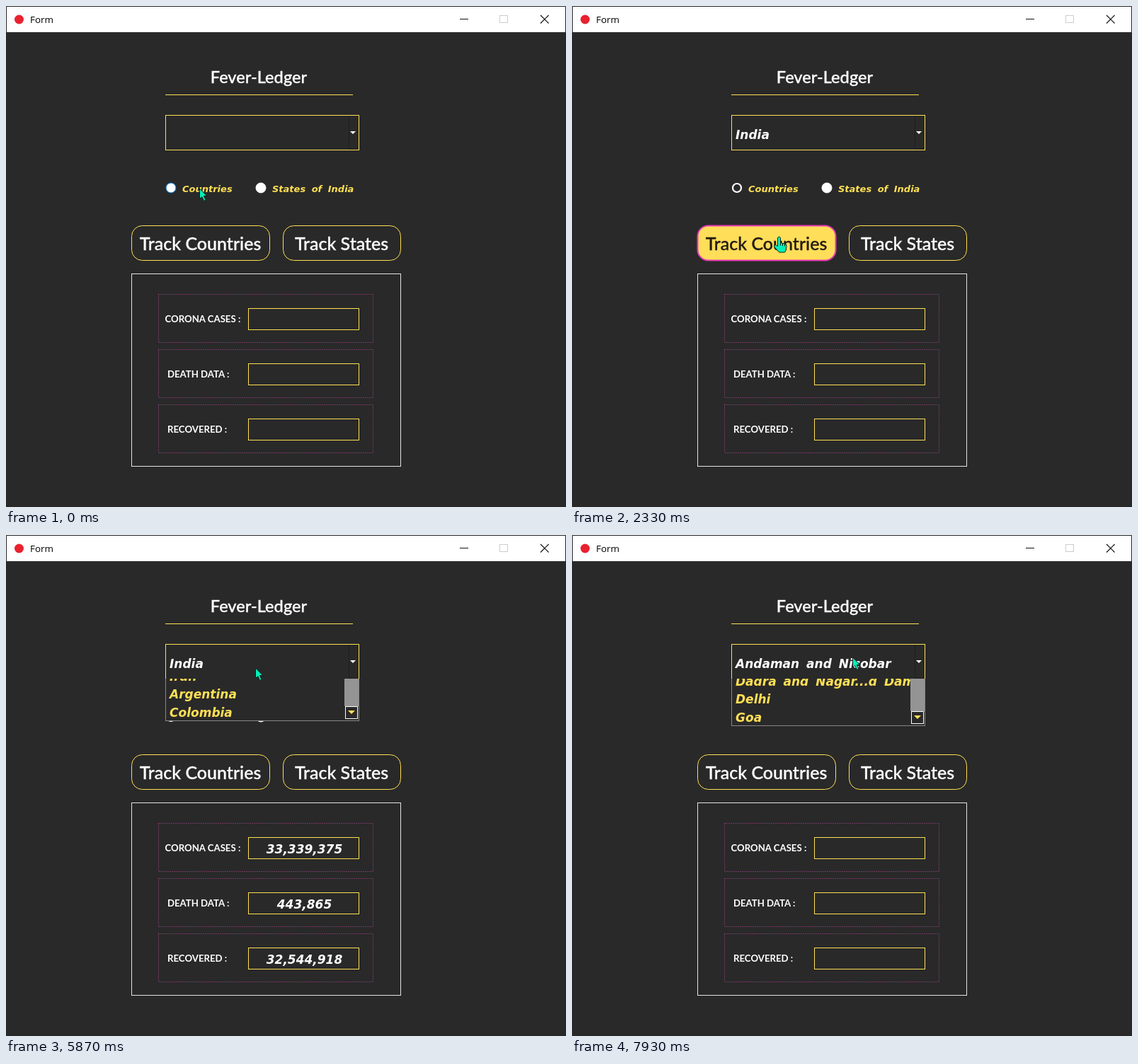
An HTML page for the animation above (8 s loop, 791 by 708 pixels).

```html
<!DOCTYPE html>
<html lang="en">
<head>
<meta charset="utf-8">
<title>Form</title>
<style>
  html, body { margin: 0; width: 791px; height: 708px; overflow: hidden; background: #292929; }
  svg { display: block; }
  text { fill: #fff; white-space: pre; }
  .title { font: 500 25px Lato, sans-serif; stroke: #fff; stroke-width: .35px; }
  .label { font: 700 13.2px Lato, sans-serif; }
  .hand { font: italic 700 17px "DejaVu Sans", sans-serif; word-spacing: 4px; }
  .radio { font-size: 13px; }
  .radio, .row { fill: #ffe054; }
  .num { text-anchor: middle; }
  .mid { text-anchor: middle; }
  .box { fill: none; stroke: #ffe054; }
  .dots { fill: none; stroke: #b8489c; stroke-dasharray: 1 2; }
  .hover rect { fill: #ffde59; stroke: #e63bb4; stroke-width: 2; }
  .hover text { fill: #241c10; stroke: #241c10; }
  .cursor { fill: #00f0b8; stroke: #10201c; }
</style>
</head>
<body>
<svg width="791" height="708">
  <defs>
    <pattern id="check" width="2" height="2" patternUnits="userSpaceOnUse">
      <rect width="2" height="2" fill="#292929"/>
      <path d="M0 0h1v1h-1zM1 1h1v1h-1z" fill="#fff"/>
    </pattern>
  </defs>

  <rect width="791" height="708" fill="#292929"/>
  <rect width="791" height="37" fill="#fff"/>
  <path d="M.5 708V.5H790.5V708M0 707.5H791" fill="none" stroke="#262626"/>
  <circle cx="18.5" cy="19" r="6.5" fill="#e8222e"/>
  <text x="34" y="24" style="font:13.4px 'Open Sans',sans-serif;fill:#000">Form</text>
  <path d="M641 18.5h12M755 13l11.5 11.5M766.5 13L755 24.5" stroke="#111" stroke-width="1.2"/>
  <rect x="697.5" y="13.5" width="11" height="10" fill="none" stroke="#ccc"/>

  <text class="title mid" x="357" y="109" style="font-size:23.6px">Fever-Ledger</text>
  <path class="box" d="M225 125.5H490"/>

  <rect class="box" x="225.5" y="154.5" width="273" height="49"/>
  <path d="M484.5 156V202.5H497" fill="none" stroke="#1f1f1f"/>
  <path d="M486 177h8l-4 4z" fill="#fff"/>
  <text id="choice" class="hand" x="231" y="187.5"></text>

  <g id="radios"></g>
  <g id="buttons"></g>

  <rect x="177.5" y="378.5" width="380" height="272" fill="none" stroke="#e4e4e4"/>
  <g id="fields"></g>

  <svg x="225" y="203" width="278" height="256">
    <g id="popup">
      <rect id="shade" x="274" y="4" width="4" height="252" fill="#000" opacity=".3"/>
      <rect x=".5" y=".5" width="273" height="255" fill="#292929" stroke="#888"/>
      <g id="rows"></g>
      <rect x="253" y="1" width="20" height="254" fill="#292929"/>
      <rect x="253" y="42" width="21" height="193" fill="url(#check)"/>
      <g fill="#292929" stroke="#fff">
        <rect x="254.5" y="2.5" width="17" height="17"/>
        <rect x="254.5" y="22.5" width="17" height="19"/>
        <rect x="254.5" y="235.5" width="17" height="17"/>
      </g>
      <path d="M258 13h10l-5-5zM258 241h10l-5 5z" fill="#ffe054"/>
      <path d="M273.5 1V255" stroke="#888"/>
    </g>
  </svg>

  <path id="arrow" class="cursor" d="M0 -.5V14L3.3 11L6 17L8.5 15.8L6 10H10.3Z"/>
  <path id="finger" class="cursor" d="M-1 1Q1 -2 3 1V8L9 9.5Q12 10 11.5 13L10.5 19L9 21.5H1L-6 13.5Q-6 11 -4 11L-1 13ZM3 8V12M6 9V12.5M9 9.5V13"/>
</svg>

<script>
const $ = id => document.getElementById(id);
const STEP = 8000 / 120, ROW = 25.44;
const countries = ["USA", "India", "Brazil", "UK", "Russia", "France", "Turkey", "Iran", "Argentina", "Colombia"];
const states = ["Andaman and Nicobar", "Andhra Pradesh", "Arunachal Pradesh", "Assam", "Bihar", "Chandigarh",
  "Chhattisgarh", "Dadra and Nagar...d Dam", "Delhi", "Goa"];

$("radios").innerHTML = [[233, "Countries"], [360, "States of India"]].map(([x, name]) =>
  `<circle cx="${x}" cy="257"/><text class="hand radio" x="${x + 16}" y="263">${name}</text>`).join("");

$("buttons").innerHTML = [[177.5, 195, "Countries"], [391.5, 166, "States"]].map(([x, w, name]) =>
  `<g><rect class="box" x="${x}" y="310.5" width="${w}" height="49" rx="15"/>
   <text class="title mid" x="${x + w / 2 - .5}" y="345">Track ${name}</text></g>`).join("");

$("fields").innerHTML = [["CORONA CASES :", 224.5], ["DEATH DATA :", 228], ["RECOVERED :", 228]].map(([name, x], i) =>
  `<g transform="translate(0 ${78 * i})"><rect class="dots" x="215.5" y="407.5" width="303" height="68"/>
   <text class="label" x="${x}" y="447">${name}</text>
   <rect class="box" x="342.5" y="427.5" width="156" height="30"/>
   <text class="hand num" x="421.5" y="449.5"></text></g>`).join("");

const totals = ["33,339,375", "443,865", "32,544,918"];
const dials = document.querySelectorAll("#radios circle");
const buttons = $("buttons").children;
const nums = document.querySelectorAll(".num");

// Pointer stops: step, x, y
const path = [[1, 273, 258], [8, 449, 187], [14, 449, 187], [21, 390, 243], [25, 390, 243], [35, 291, 326],
  [74, 291, 326], [81, 352, 188], [90, 352, 188], [95, 322, 301], [99, 322, 301], [104, 380, 167],
  [105, 380, 167], [112, 396, 252], [119, 396, 173]];

// Popup openings: first step, end step, upward offset on each opening step
const openings = [[10, 26, 196, 97], [88, 105, 196, 97], [119, 120, 189]];

function pointer(k) {
  const i = path.findIndex(p => p[0] >= k);
  if (i === 0) return path[0].slice(1);
  const [a, b] = [path[i - 1], path[i]];
  const u = (k - a[0]) / (b[0] - a[0]), e = u * u * (3 - 2 * u);
  return [a[1] + (b[1] - a[1]) * e, a[2] + (b[2] - a[2]) * e];
}

function drawRows(list, active) {
  $("rows").innerHTML = list.map((name, i) => {
    const y = 1 + ROW * i, on = i === active;
    const bar = on ? `<rect x="1.5" y="${Math.round(y) + .5}" width="251" height="24.5" fill="#0078d7"
      stroke="#e08a40" stroke-dasharray="1 1"/>` : "";
    return bar + `<text class="hand${on ? "" : " row"}" x="6" y="${y + 19.7}">${name}</text>`;
  }).join("");
}

function draw(k) {
  const [x, y] = pointer(k);
  const inside = (l, t, r, b) => x >= l && x < r && y >= t && y < b;
  const isStates = k >= 113, list = isStates ? states : countries;
  const current = k >= 26 && !isStates ? 1 : 0;
  $("choice").textContent = k < 1 ? "" : list[current];

  const open = openings.find(o => k >= o[0] && k < o[1]);
  $("popup").style.display = open ? "" : "none";
  if (open) {
    const shift = open[2 + k - open[0]] || 0;
    $("popup").setAttribute("transform", `translate(0 ${-shift})`);
    $("shade").style.display = shift ? "none" : "";
    drawRows(list, inside(226, 204, 478, 458) ? Math.floor((y - 204) / ROW) : current);
  }

  const picked = k < 1 ? -1 : +isStates;
  dials.forEach((dial, i) => {
    const on = i === picked;
    const hover = !open && inside(...(i ? [352, 247, 493, 268] : [225, 247, 322, 268]));
    dial.setAttribute("r", on ? 6 : 7);
    dial.setAttribute("fill", on ? "#292929" : "#fff");
    dial.setAttribute("stroke", hover && !on ? "#0078d7" : "#fff");
    dial.setAttribute("stroke-width", on ? 2.2 : 1);
  });

  const over = [inside(177, 310, 373, 360), inside(391, 310, 558, 360)].map(h => h && !open);
  over.forEach((h, i) => buttons[i].setAttribute("class", h ? "hover" : ""));
  const pointing = over.includes(true);
  nums.forEach((n, i) => n.textContent = k >= 68 && !isStates ? totals[i] : "");

  for (const [id, shown] of [["arrow", !pointing], ["finger", pointing]]) {
    $(id).style.display = shown ? "" : "none";
    $(id).setAttribute("transform", `translate(${Math.round(x) + .5} ${Math.round(y) + .5})`);
  }
}

let last = -1;
const start = performance.now();
function tick() {
  const t = Math.max(0, performance.now() - start) % 8000;
  const k = Math.min(119, Math.floor((t + 4) / STEP));
  if (k !== last) draw(last = k);
  requestAnimationFrame(tick);
}
tick();
</script>
</body>
</html>
```
